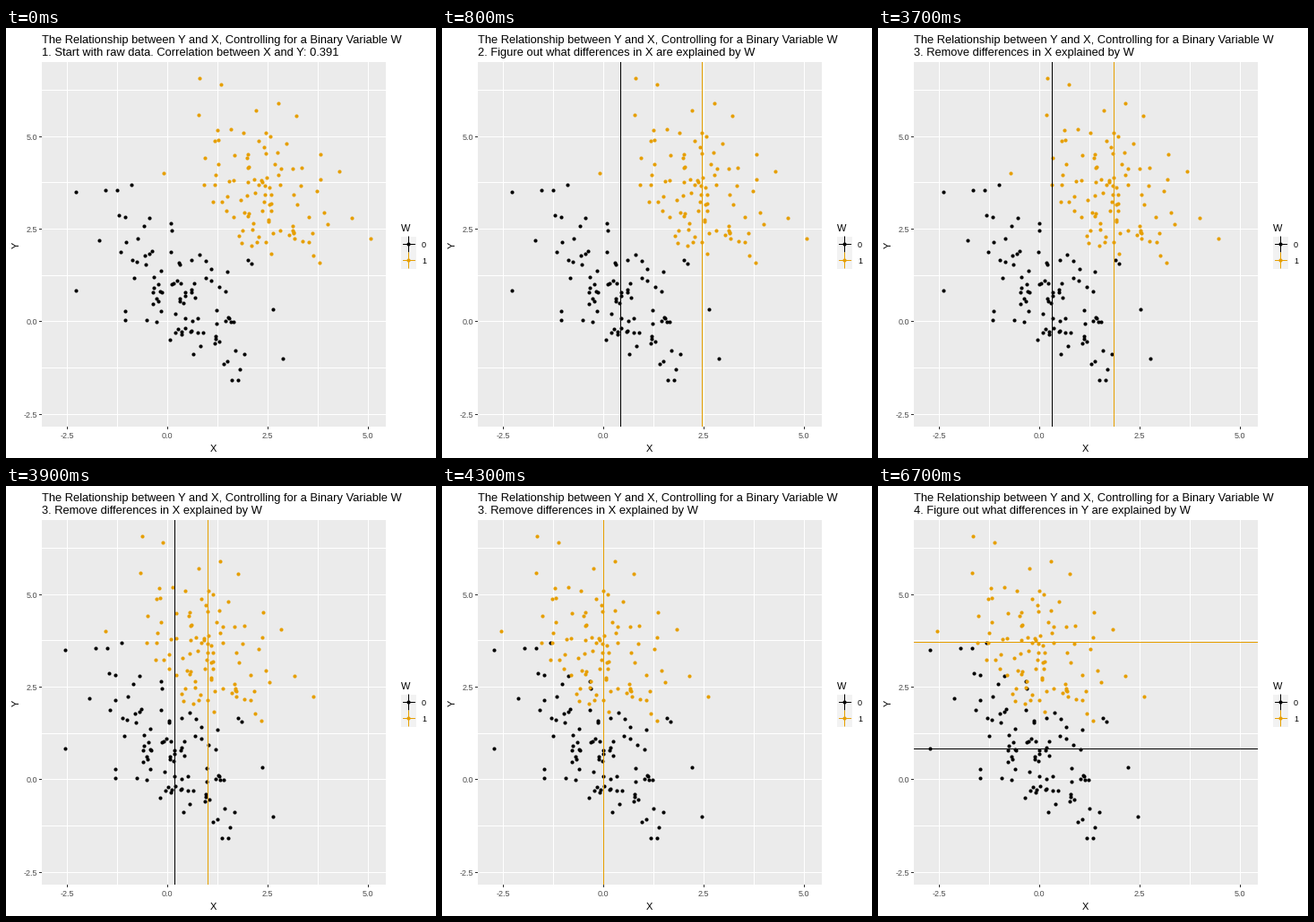
A matplotlib script that plays this animation: 480 by 480 pixels, repeating every 8000 ms.

```python
import numpy as np
import matplotlib.pyplot as plt
from matplotlib.animation import FuncAnimation

SIZE = 480
FRAME_MS = 100
FRAMES = 80
LEFT, RIGHT, TOP, BOTTOM = 40, 424, 38, 445
X_ZERO, X_UNIT = 180.5, 44.76
Y_ZERO, Y_UNIT = 327.7, 41.32
BLACK, ORANGE = "black", "#E69F00"

HEADING = "The Relationship between Y and X, Controlling for a Binary Variable W"
STEPS = [
    (0, "1. Start with raw data. Correlation between X and Y: 0.391"),
    (500, "2. Figure out what differences in X are explained by W"),
    (3500, "3. Remove differences in X explained by W"),
    (6400, "4. Figure out what differences in Y are explained by W"),
]


def px(x):
    return X_ZERO + X_UNIT * x


def py(y):
    return Y_ZERO - Y_UNIT * y


def pixel_center(value):
    return np.floor(value) + 0.5


def make_group(mean, outliers, seed):
    """100 points: Y falls by half of X plus noise, with a few set outliers."""
    rng = np.random.default_rng(seed)
    dx, noise = rng.normal(0, 1, (2, 400))
    keep = (np.abs(dx) < 1.7) & (np.abs(noise) < 1.9)
    cloud = np.column_stack([dx, noise - 0.5 * dx])[keep][:100 - len(outliers)]
    return np.vstack([cloud + mean, outliers])


MEANS = [(0.43, 0.83), (2.46, 3.71)]
COLORS = [BLACK, ORANGE]
OUTLIERS = [
    [(-2.3, 3.5), (-2.3, 0.85), (-1.55, 3.55), (-0.9, 3.7), (-1.7, 2.2),
     (2.87, -1.0), (2.62, 0.33), (1.6, -1.57), (1.75, -1.57)],
    [(0.8, 6.58), (1.33, 6.4), (2.75, 5.9), (3.2, 5.55), (4.28, 4.05),
     (5.07, 2.25), (4.6, 2.8), (3.78, 1.6), (-0.1, 4.0)],
]
GROUPS = [make_group(mean, far, seed)
          for mean, far, seed in zip(MEANS, OUTLIERS, (4, 7))]

fig = plt.figure(figsize=(SIZE / 72, SIZE / 72), dpi=72, facecolor="white")
ax = fig.add_axes([0, 0, 1, 1])
ax.set(xlim=(0, SIZE), ylim=(SIZE, 0))
ax.axis("off")


def rect(x, y, w, h, color):
    ax.add_patch(plt.Rectangle((x, y), w, h, color=color, lw=0, zorder=0))


def segment(x0, y0, x1, y1, color, zorder=1):
    return ax.plot([x0, x1], [y0, y1], color=color, lw=1, zorder=zorder,
                   solid_capstyle="butt", snap=False)[0]


def v_segment(x, color, zorder=1):
    x = pixel_center(x)
    return segment(x, TOP, x, BOTTOM, color, zorder)


def h_segment(y, color, zorder=1):
    y = pixel_center(y)
    return segment(LEFT, y, RIGHT, y, color, zorder)


def label(x, y, text, size, color="black", ha="left", **kw):
    kw.setdefault("va", "baseline")
    return ax.text(x, y, text, fontsize=size, color=color, ha=ha,
                   family="Liberation Sans", **kw)


def dots(x, y, color, zorder=3):
    return ax.scatter(x, y, s=17, color=color, lw=0, zorder=zorder,
                      antialiased=False)


rect(LEFT, TOP, RIGHT - LEFT, BOTTOM - TOP, "#EBEBEB")
for value in np.arange(-2.5, 6.5, 1.25):
    x, y = pixel_center(px(value)), pixel_center(py(value))
    major = value % 2.5 == 0
    if x < RIGHT:
        v_segment(x, "white")
        if major:
            segment(x, BOTTOM, x, BOTTOM + 3, "#333333")
            label(x - 0.5, 458, f"{value:.1f}", 9, "#4D4D4D", "center")
    h_segment(y, "white")
    if major:
        segment(LEFT - 3, y, LEFT, y, "#333333")
        label(35.5, y + 3.5, f"{value:.1f}", 9, "#4D4D4D", "right")

label(231.5, 473, "X", 11, ha="center")
label(11.5, 242, "Y", 11, ha="center", va="center", rotation=90)
label(39.5, 17, HEADING, 12.9)
subtitle = label(39.5, 31, "", 12.9)

label(441, 227, "W", 11)
for i, color in enumerate(COLORS):
    y = 241.5 + 18 * i
    rect(441, y - 9, 17, 18, "#F2F2F2")
    segment(449.5, y - 9, 449.5, y + 9, color, zorder=3)
    segment(443, y, 457, y, color, zorder=3)
    dots([449], [y - 0.5], color, 4)
    label(464, y + 3.5, str(i), 9)

clouds = [dots(px(g[:, 0]), py(g[:, 1]), c) for g, c in zip(GROUPS, COLORS)]
v_lines = [v_segment(px(m[0]), c, 5) for m, c in zip(MEANS, COLORS)]
h_lines = [h_segment(py(m[1]), c, 5) for m, c in zip(MEANS, COLORS)]


def slide(t):
    """Sine ease over nine steps, already one step in at its first frame."""
    u = np.clip((t - 3500 + FRAME_MS) / 900, 0, 1)
    return (1 - np.cos(np.pi * u)) / 2


def update(frame):
    t = frame * FRAME_MS
    subtitle.set_text([text for start, text in STEPS if t >= start][-1])
    p = slide(t)
    for g, (mean_x, _), cloud, v, h in zip(GROUPS, MEANS, clouds, v_lines, h_lines):
        cloud.set_offsets(np.column_stack([px(g[:, 0] - mean_x * p), py(g[:, 1])]))
        v.set_xdata([pixel_center(px(mean_x * (1 - p)))] * 2)
        v.set_visible(800 <= t < 6400)
        h.set_visible(t >= 6700)
    return []


anim = FuncAnimation(fig, update, frames=FRAMES, interval=FRAME_MS,
                     repeat=True, repeat_delay=0)
plt.show()
```
